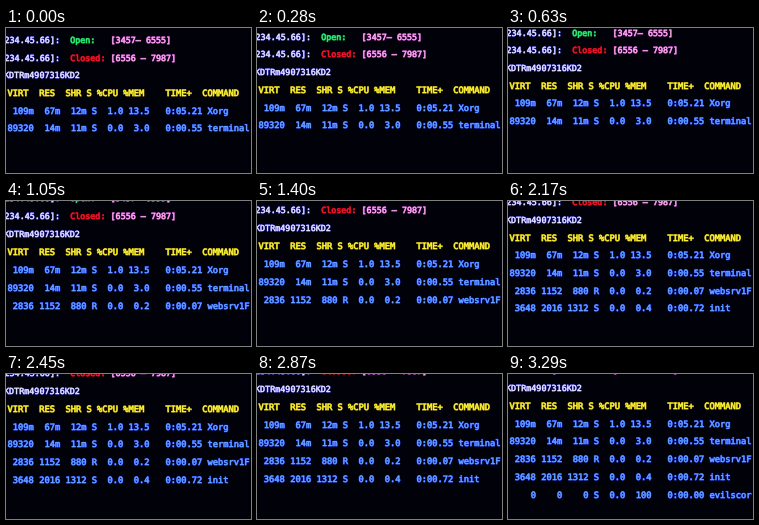
Animation of 245 by 145 pixels, one loop 3.36 s. Source, as an HTML page with a canvas:

```html
<!DOCTYPE html>
<html lang="en">
<head>
<meta charset="utf-8">
<title>Terminal</title>
<style>
html, body { margin: 0; width: 100%; height: 100%; overflow: hidden; background: #010109; }
canvas { display: block; width: 245px; height: 145px; }
</style>
</head>
<body>
<canvas id="stage" width="245" height="145"></canvas>
<script>
const ctx = document.getElementById('stage').getContext('2d');
const LOOP = 3360, STEP = 70;

// core and bloom of each text colour
const PALE = ['#f2eeff', '#2c2cc8'], GREEN = ['#2cf47c', '#067a30'],
      RED = ['#f41830', '#90000c'], PINK = ['#ffb8ea', '#8c1c98'],
      YELLOW = ['#fff83c', '#8c7400'], BLUE = ['#6ca8ff', '#1030e4'];

// time, header y, row gap
const camera = [
  [0, 65, 17.6],
  [630, 57.6, 17.7],
  [1050, 50.6, 18],
  [1400, 45, 18],
  [1890, 38.2, 17.5],
  [2450, 34.5, 17.9],
  [3290, 31.5, 17.9],
  [LOOP, 31.3, 17.9]
];

// line counts from the table header; parts are [column, text, colour]
const rows = [
  { line: -3, x: -1.5, pitch: 5.05, at: 0, parts: [
    [0, '234.45.66]:', PALE], [13, 'Open:', GREEN], [21, '[3457– 6555]', PINK]] },
  { line: -2, x: -1.5, pitch: 5.05, at: 0, parts: [
    [0, '234.45.66]:', PALE], [13, 'Closed:', RED], [21, '[6556 – 7987]', PINK]] },
  { line: -1, x: -2, pitch: 5.07, at: 0, parts: [[0, 'KDTRm4907316KD2', PALE]] },
  table(0, 0, 'VIRT  RES  SHR S %CPU %MEM    TIME+  COMMAND', YELLOW),
  table(1, 0, ' 109m  67m  12m S  1.0 13.5   0:05.21 Xorg', BLUE),
  table(2, 0, '89320  14m  11m S  0.0  3.0   0:00.55 terminal', BLUE),
  table(3, 700, ' 2836 1152  880 R  0.0  0.2   0:00.07 websrv1F', BLUE),
  table(4, 1540, ' 3648 2016 1312 S  0.0  0.4   0:00.72 init', BLUE),
  table(5, 2940, '    0    0    0 S  0.0  100   0:00.00 evilscor', BLUE)
];

function table(line, at, text, color) {
  return { line, x: 1.6, pitch: 5.26, at, parts: [[0, text, color]] };
}

function view(t) {
  let i = 0;
  while (i < camera.length - 2 && t >= camera[i + 1][0]) i++;
  const a = camera[i], b = camera[i + 1], k = (t - a[0]) / (b[0] - a[0]);
  return a.map((v, n) => v + (b[n] - v) * k);
}

function glowText(text, x, y, [core, bloom]) {
  ctx.strokeStyle = bloom;
  ctx.lineWidth = 1.2;
  ctx.strokeText(text, x, y);
  ctx.fillStyle = ctx.strokeStyle = core;
  ctx.lineWidth = 0.35;
  ctx.fillText(text, x, y);
  ctx.strokeText(text, x, y);
}

function drawRow({ x, pitch, parts }, y) {
  const size = pitch / 0.602;
  ctx.font = `${size}px "DejaVu Sans Mono", monospace`;
  for (const [col, text, color] of parts) {
    for (const word of text.matchAll(/\S+/g)) {
      glowText(word[0], x + (col + word.index) * pitch, y + size * 0.365, color);
    }
  }
}

function draw(now) {
  const t = Math.floor((now % LOOP) / STEP) * STEP;
  const [, top, gap] = view(t);
  ctx.fillStyle = '#010109';
  ctx.fillRect(0, 0, 245, 145);
  ctx.textRendering = 'geometricPrecision';
  ctx.lineJoin = 'round';
  for (const row of rows) {
    if (t >= row.at) drawRow(row, top + row.line * gap);
  }
}

const start = performance.now();
function tick() {
  draw(performance.now() - start);
  requestAnimationFrame(tick);
}
tick();
</script>
</body>
</html>
```
